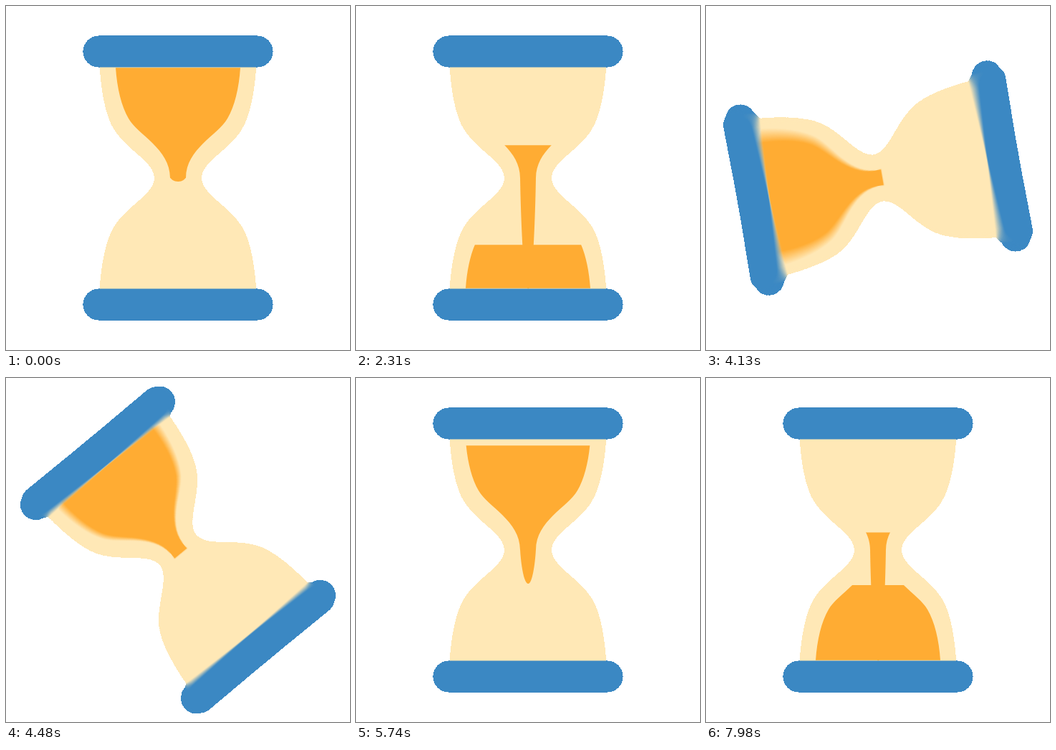
An HTML page with a canvas that plays this animation: 480x480 px, repeating every 8000 ms.

```html
<!DOCTYPE html>
<html lang="en">
<head>
<meta charset="utf-8">
<title>Hourglass</title>
<style>
  html, body { margin: 0; height: 100%; overflow: hidden; background: #fff; }
  canvas { display: block; width: 100vw; height: 100vh; }
</style>
</head>
<body>
<canvas id="stage" width="480" height="480"></canvas>
<script>
const SIZE = 480, LOOP = 8000, STEP = 70, CYCLE = 5250;
const FALL = 1400, DRAIN = 3500;
const SHUTTER = 35, SAMPLES = 15;
const EDGE_ALPHA = 102;

const stage = document.getElementById('stage').getContext('2d', { willReadFrequently: true });
const pose = makeLayer();
const blur = makeLayer();

function makeLayer() {
  const canvas = document.createElement('canvas');
  canvas.width = canvas.height = SIZE;
  return canvas.getContext('2d', { willReadFrequently: true });
}

const glass = new Path2D();
glass.addPath(new Path2D(`M15 18C15 16 11.754 14.631 10 12C8 9 8 2 8 2H28S28 9 26 12
  C24.246 14.631 21 16 21 18C21 20 24.246 21.369 26 24C28 27 28 34 28 34
  H8S8 27 10 24C11.754 21.369 15 20 15 18Z`), new DOMMatrix([11, 0, 0, 11, 42, 42]));

const caps = new Path2D();
caps.roundRect(107.5, 41.5, 265, 44, 22);
caps.roundRect(107.5, 394.5, 265, 44, 22);

// Sand filling the upper bulb; turned by 180 degrees it fills the lower one.
const sand = new Path2D(`M153 86C155 115 161 140 171 157C184 180 229 199 229 240
  H251C251 199 296 180 309 157C319 140 325 115 327 86Z`);

const clamp = x => Math.min(1, Math.max(0, x));
const smooth = x => (x = clamp(x), x * x * (3 - 2 * x));
const mix = (a, b, k) => a + (b - a) * k;

// Cubic Bezier easing with control points (.35, 0) and (.35, 1).
function turnEase(x) {
  x = clamp(x);
  let low = 0, high = 1;
  for (let i = 0; i < 24; i++) {
    const p = (low + high) / 2, q = 1 - p;
    if (1.05 * p * q + p * p * p < x) low = p; else high = p;
  }
  return smooth(low);
}

const angleAt = t => Math.PI * turnEase((t - DRAIN) / (CYCLE - DRAIN));

function fillBetween(ctx, path, top, bottom, flipped) {
  ctx.save();
  ctx.beginPath();
  ctx.rect(100, top, 280, bottom - top);
  ctx.clip();
  if (flipped) {
    ctx.translate(SIZE, SIZE);
    ctx.rotate(Math.PI);
  }
  ctx.fill(path);
  ctx.restore();
}

function streamPath(tip) {
  const upper = mix(239, tip, 0.4);
  return new Path2D(`M229 239C230 ${upper} 234 ${tip} 240.3 ${tip}
    C246 ${tip} 250 ${upper} 251 239Z`);
}

function drawSand(ctx, t) {
  const level = mix(86.3, 233.7, smooth(t / DRAIN));
  const tip = mix(245, 394.5, smooth(t / FALL));
  const pile = mix(393.7, 243, smooth((t - FALL) / (DRAIN - FALL)));
  fillBetween(ctx, sand, level, 240, false);
  ctx.fill(streamPath(tip));
  fillBetween(ctx, sand, pile, 393.7, true);
}

// Averages one upright part over the given angles, tints it and adds it to the stage.
function addPart(color, angles, draw) {
  pose.clearRect(0, 0, SIZE, SIZE);
  draw(pose);

  blur.clearRect(0, 0, SIZE, SIZE);
  blur.save();
  blur.globalCompositeOperation = 'lighter';
  blur.globalAlpha = 1 / angles.length;
  for (const angle of angles) {
    blur.setTransform(1, 0, 0, 1, 240, 240);
    blur.rotate(angle);
    blur.drawImage(pose.canvas, -240, -240);
  }
  blur.restore();

  blur.save();
  blur.globalCompositeOperation = 'source-in';
  blur.fillStyle = color;
  blur.fillRect(0, 0, SIZE, SIZE);
  blur.restore();
  stage.drawImage(blur.canvas, 0, 0);
}

// Makes the silhouette hard-edged while inner edges stay soft.
function hardenOutline() {
  const image = stage.getImageData(0, 0, SIZE, SIZE);
  for (let i = 3; i < image.data.length; i += 4) {
    image.data[i] = image.data[i] > EDGE_ALPHA ? 255 : 0;
  }
  stage.putImageData(image, 0, 0);
}

function render(t) {
  const angles = t <= DRAIN ? [0] : Array.from({ length: SAMPLES },
    (_, i) => angleAt(t + SHUTTER * ((i + 0.5) / SAMPLES - 0.5)));
  stage.clearRect(0, 0, SIZE, SIZE);
  addPart('#ffe8b6', angles, ctx => ctx.fill(glass));
  addPart('#ffac33', angles, ctx => drawSand(ctx, t));
  addPart('#3b88c3', angles, ctx => ctx.fill(caps));
  hardenOutline();
}

const start = performance.now();
let shown = -1;
function tick() {
  const time = (performance.now() - start) % LOOP;
  const step = Math.floor(time / STEP);
  if (step !== shown) {
    shown = step;
    render(step * STEP % CYCLE);
  }
  requestAnimationFrame(tick);
}
tick();
</script>
</body>
</html>
```
